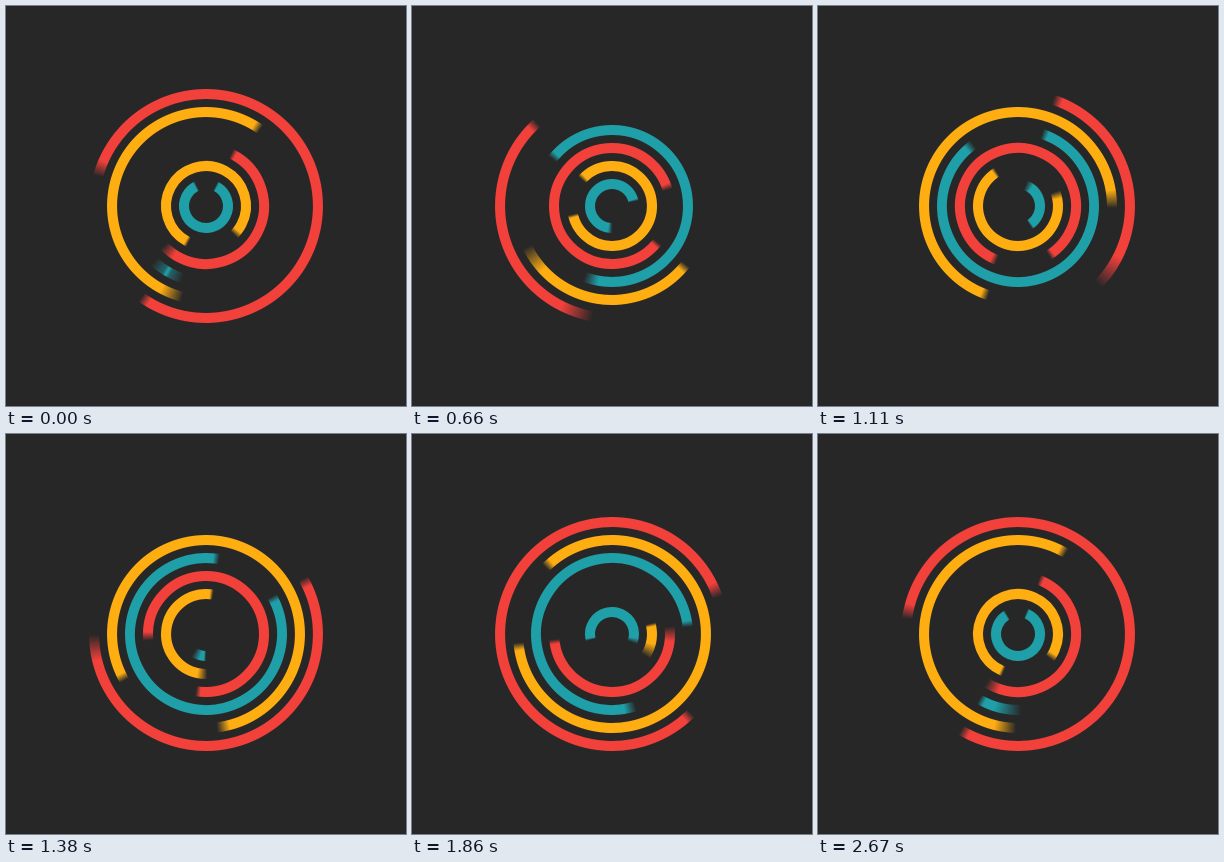
Animation of 400x400 px, one loop 2700 ms. Source, as an HTML page with a canvas:

```html
<!DOCTYPE html>
<html lang="en">
<head>
<meta charset="utf-8">
<title>Chasing arcs</title>
<style>
  html, body { margin: 0; height: 100%; overflow: hidden; background: #272727; }
  canvas { display: block; }
</style>
</head>
<body>
<canvas id="stage" width="400" height="400"></canvas>
<script>
const ctx = document.getElementById('stage').getContext('2d');
const LOOP = 2700, STEP = 30, SAMPLES = 15;
const COLORS = ['#f2403b', '#ffae12', '#1f9fa8'];
const RINGS = 6, DRIFT = 420, LEAP = 300, MIN_ARC = 5, POWER = 2.4;

const radius = ring => 112 - 18 * ring;

// Start and end angle in degrees: a steady drift, plus a leap of the
// end in the first half of the cycle and of the start in the second.
function arcAt(ring, ms) {
  const u = ms / LOOP;
  const phase = u + ring / RINGS - 1 / 3;
  const turn = Math.floor(phase);
  const v = 2 * (phase - turn);
  const start = v < 1 ? 0 : (v - 1) ** POWER;
  const end = v < 1 ? 1 - (1 - v) ** POWER : 1;
  const base = 118 + 180 * ring + DRIFT * u + LEAP * turn;
  return [base + LEAP * start, base + LEAP * end + MIN_ARC];
}

function strokeArc(r, from, to) {
  ctx.beginPath();
  ctx.arc(200, 200, r, from * Math.PI / 180, to * Math.PI / 180);
  ctx.stroke();
}

function draw(ms) {
  ctx.clearRect(0, 0, 400, 400);

  // Motion blur: add up evenly spaced moments of one step.
  ctx.globalCompositeOperation = 'lighter';
  ctx.strokeStyle = `rgba(255, 255, 255, ${1 / SAMPLES})`;
  ctx.lineWidth = 10;
  for (let ring = 0; ring < RINGS; ring++) {
    for (let i = 0; i < SAMPLES; i++) {
      const shift = ((i + 0.5) / SAMPLES - 0.5) * STEP;
      strokeArc(radius(ring), ...arcAt(ring, ms + shift));
    }
  }

  // Tint each ring, keeping the accumulated opacity.
  ctx.globalCompositeOperation = 'source-atop';
  ctx.lineWidth = 14;
  for (let ring = 0; ring < RINGS; ring++) {
    ctx.strokeStyle = COLORS[ring % 3];
    strokeArc(radius(ring), 0, 360);
  }
}

function tick() {
  const ms = performance.now() % LOOP;
  draw(Math.floor(ms / STEP) * STEP);
  requestAnimationFrame(tick);
}
tick();
</script>
</body>
</html>
```
